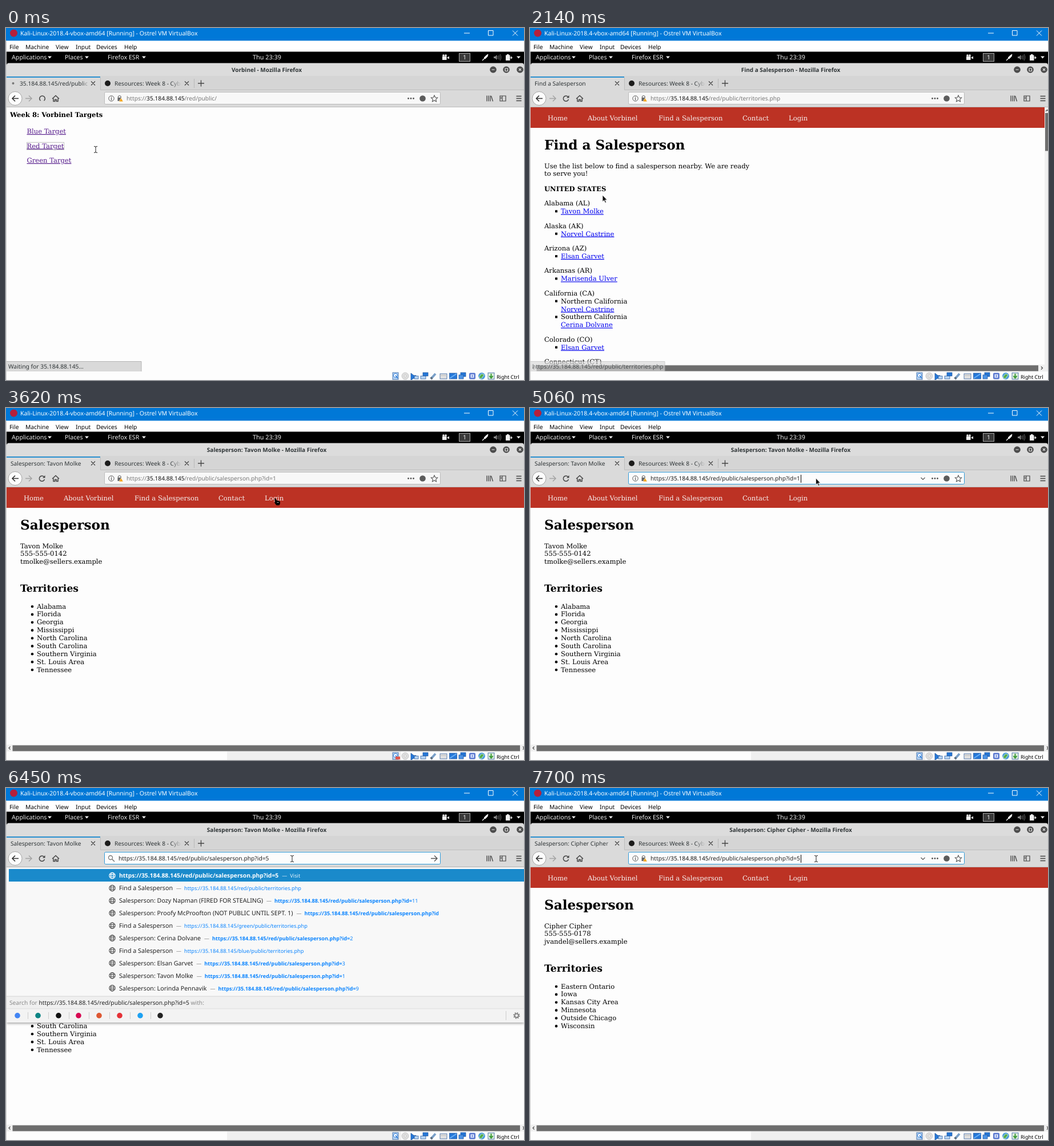
Animation, 907 px wide and 617 px high, one loop 8000 ms. Source, as an HTML page:

```html
<!DOCTYPE html>
<html lang="en">
<head>
<meta charset="utf-8">
<title>Browser session</title>
<style>
  html, body { margin: 0; width: 100%; height: 100%; overflow: hidden; background: #fdfdfd; }
  svg { display: block; }
  text { font-family: "Noto Sans", "Open Sans", sans-serif; white-space: pre; text-rendering: geometricPrecision; }
  .doc { font-family: "DejaVu Serif", serif; }
  .bold { font-weight: bold; }
  .mid { text-anchor: middle; }
  .link { text-decoration: underline; }
</style>
</head>
<body>
<svg id="stage" width="907" height="617" viewBox="0 0 907 617"></svg>
<script>
const LOOP = 8000, INK = '#2e3436', BLUE = '#0a84ff', SCROLL = '#6e6e6e';
const COMPANY = 'Vorbinel', HOST = '35.184.88.145', SITE = `https://${HOST}/red/public/`;
const SELLER = SITE + 'salesperson.php?id=';

const rect = (x, y, w, h, fill, extra = '') =>
  `<rect x="${x}" y="${y}" width="${w}" height="${h}" fill="${fill}" ${extra}/>`;
const dot = (x, y, r, fill, extra = '') => `<circle cx="${x}" cy="${y}" r="${r}" fill="${fill}" ${extra}/>`;
const path = (d, stroke = INK, width = 1.2, fill = 'none') =>
  `<path d="${d}" stroke="${stroke}" stroke-width="${width}" fill="${fill}"/>`;
const text = (x, y, s, size = 10.2, fill = INK, cls = '') =>
  `<text x="${x}" y="${y}" font-size="${size}" fill="${fill}" class="${cls}">${s}</text>`;
const doc = (x, y, s, size = 11.6, fill = '#000', cls = '') => text(x, y, s, size, fill, 'doc ' + cls);
const span = (s, fill, size, dx = 0, weight = 400) =>
  `<tspan dx="${dx}" fill="${fill}" font-size="${size}" font-weight="${weight}">${s}</tspan>`;
const within = (t, ranges) => ranges.some(([a, b]) => t >= a && t < b);
const latest = (list, t) => list.filter(e => e[0] <= t).pop();

// ---- web pages ----
const LINE = 13.88;
const lines = (y, rows, x = 25) => rows.map((s, i) => doc(x, y + i * LINE, s)).join('');
const heading = s => doc(25, 213, s, 23.2, '#000', 'bold');

const navigation = () => rect(1, 139, 906, 36, '#bc3224') +
  [[31, 'Home'], [101, 'About ' + COMPANY], [225, 'Find a Salesperson'], [372, 'Contact'], [453, 'Login']]
    .map(([x, s]) => doc(x, 162, s, 11.6, '#f6f0ef')).join('');

const scrollbar = end => rect(1, 590, 906, 12, '#f0f0f0') + rect(11.5, 591.3, end - 11.5, 10.2, SCROLL) +
  path(`M7.5 593.5l-2.5 2.5 2.5 2.5M${end + 5} 593.5l2.5 2.5-2.5 2.5`, '#444');

function targets() {
  const link = (y, s) => doc(36.5, y, s, 11.6, '#551a8b', 'link');
  return doc(7, 156, `Week 8: ${COMPANY} Targets`, 11.6, '#000', 'bold') +
    link(185, 'Blue Target') + link(210.6, 'Red Target') + link(236, 'Green Target') +
    rect(36.5, 200.5, 65, 13, 'none', 'stroke="#888" stroke-dasharray="1 1"');
}

function home() {
  return navigation() + heading(`Welcome to ${COMPANY}!`) + lines(245.6, [
    COMPANY + ' is a world-wide industry leader with many award-',
    'winning products which have become well-known household',
    'names. Our staff of experts are dedicated to finding synergies',
    'across a wide variety of vertical markets and integrating',
    'technology into everyday life.']) + scrollbar(900);
}

// "*" starts a bullet, "_" marks a link
const STATES = [
  ['Alabama (AL)', '*_Tavon Molke'], ['Alaska (AK)', '*_Norvel Castrine'],
  ['Arizona (AZ)', '*_Elsan Garvet'], ['Arkansas (AR)', '*_Marisenda Ulver'],
  ['California (CA)', '*Northern California', '_Norvel Castrine', '*Southern California', '_Cerina Dolvane'],
  ['Colorado (CO)', '*_Elsan Garvet'], ['Connecticut (CT)']];

function territories() {
  let y = 311.4, out = '';
  for (const rows of STATES) {
    rows.forEach((row, i) => {
      const isLink = row.includes('_');
      if (row[0] === '*') out += rect(44, y - 6, 4, 4, '#000');
      out += doc(i ? 54 : 25, y, row.replace(/[*_]/g, ''), 11.6, isLink ? '#0000ee' : '#000', isLink ? 'link' : '');
      y += LINE;
    });
    y += 11.6;
  }
  return navigation() + heading('Find a Salesperson') +
    lines(245.6, ['Use the list below to find a salesperson nearby. We are ready', 'to serve you!']) +
    doc(25, 285.8, 'UNITED STATES', 11.6, '#000', 'bold') + out + scrollbar(890) +
    rect(901, 139, 6, 463, '#f0f0f0') + rect(902, 149, 5, 66.5, SCROLL) + path('M903 146l2.5-2.5 2.5 2.5', '#444');
}

const seller = (contact, areas) => () => navigation() + heading('Salesperson') + lines(245.6, contact) +
  doc(25, 321.5, 'Territories', 17.2, '#000', 'bold') + lines(351.6, areas, 54) +
  areas.map((_, i) => dot(46, 348 + i * LINE, 2.3, '#000')).join('') + scrollbar(900);

const firstSeller = seller(['Tavon Molke', '555-555-0142', 'tmolke@sellers.example'],
  ['Alabama', 'Florida', 'Georgia', 'Mississippi', 'North Carolina', 'South Carolina',
    'Southern Virginia', 'St. Louis Area', 'Tennessee']);
const secondSeller = seller(['Cipher Cipher', '555-555-0178', 'jvandel@sellers.example'],
  ['Eastern Ontario', 'Iowa', 'Kansas City Area', 'Minnesota', 'Outside Chicago', 'Wisconsin']);

// ---- timeline ----
const PAGES = [
  [0, targets, COMPANY, '', HOST + '/red/public'],
  [150, home, COMPANY, ''],
  [1630, territories, 'Find a Salesperson', 'territories.php'],
  [3080, firstSeller, 'Salesperson: Tavon Molke', 'salesperson.php?id=1'],
  [7000, secondSeller, 'Salesperson: Cipher Cipher', 'salesperson.php?id=5']];
const STATUS = [
  [0, `Waiting for ${HOST}...`, 236], [150, ''], [1360, SITE + 'territories.php', 235],
  [2260, ''], [2680, SELLER + '1', 270], [3080, '']];
const LOADING = [[0, 420], [1630, 1900], [3080, 3350], [7000, 7430]];
const FOCUS = [[4010, 7000], [7580, LOOP]];
const CARET = [[4130, 5210], [7700, LOOP]];
const DISK_BUSY = [[1360, 1480], [3620, 3740], [4940, 5060], [7150, 7300]];
const POINTER = [
  [0, 'beam', 157, 213], [420, 'arrow', 359, 356], [550, 'arrow', 356, 330], [700, 'arrow', 353, 270],
  [820, 'arrow', 348, 205], [940, 'hand', 343, 160], [1090, 'hand', 332, 157], [1210, 'hand', 319, 153],
  [1360, 'hand', 300, 155], [1480, 'hand', 285, 157], [1900, 'arrow', 250, 190], [2020, 'arrow', 180, 250],
  [2140, 'arrow', 127, 293], [2260, 'arrow', 119, 304], [2410, 'hand', 107, 317], [2530, 'hand', 97, 324],
  [2680, 'hand', 98, 318], [3200, 'arrow', 130, 335], [3350, 'arrow', 260, 250], [3470, 'arrow', 388, 190],
  [3620, 'hand', 470, 158], [3740, 'arrow', 488, 138], [3860, 'arrow', 500.5, 123], [5890, 'beam', 501, 124]];

const SHAPES = {
  arrow: path('M0 0v11.5l2.7-2.5 2 4.4 1.8-.8-2-4.2h3.5z', '#fff', .7, '#111'),
  hand: path('M.5 1.5q1-1.5 2 0l1 3 5 1q1.5 1 1 3l-1 3.5h-5l-3-4.5q0-1 1.5-.5z', '#000', 1, '#000') +
    path('M4.5 7.5h3', '#ddd', .8),
  beam: path('M-3-5.5q2.5 0 3 1q.5-1 3-1M0-5v10M-3 5.5q2.5 0 3-1q.5 1 3 1', '#222', 1)
};

// ---- desktop and browser frame ----
const desktop = () =>
  rect(0, 0, 907, 22.5, '#0078d7') + dot(13.5, 9, 6.5, '#b5203c') +
  text(25, 13, 'Kali-Linux-2018.4-vbox-amd64 [Running] - Ostrel VM VirtualBox', 10.5, '#fff') +
  path('M802 9h10M844.5 4.5h8.5v8.5h-8.5zM887 4.5l9 9m0-9l-9 9', '#fff', 1) +
  rect(0, 22.5, 907, 19, '#fff') +
  [[6, 'File'], [34, 'Machine'], [87, 'View'], [122, 'Input'], [158, 'Devices'], [207, 'Help']]
    .map(([x, s]) => text(x, 36.5, s, 10.3, '#000')).join('') +
  rect(1, 41.5, 906, 25, '#000') +
  [[10, 'Applications', 73], [103, 'Places', 138], [178, 'Firefox ESR', 238]].map(([x, s, end]) =>
    text(x, 55.2, s, 10.7, '#eee') + path(`M${end} 49.5h7l-3.5 4z`, 'none', 0, '#eee')).join('') +
  text(457, 55.2, 'Thu 23:39', 10.8, '#eee', 'mid') +
  rect(764, 49.5, 7.5, 6.5, '#eee') + dot(766, 48, 1.8, '#eee') + dot(770, 48, 1.8, '#eee') +
  path('M772 52l4-2.5v5z', 'none', 0, '#eee') +
  rect(793.5, 44.5, 19, 14, '#3a3a3a', 'stroke="#aaa"') + text(803, 55.2, '1', 10.5, '#eee', 'mid') +
  path('M834 57l4-4', '#eee', 1.5) + path('M837 52l4-4 3-2-1 4-4 4z', '#eee', 1, '#eee') +
  path('M854 50h2.5l3-3v9l-3-3h-2.5z', 'none', 0, '#888') +
  path('M861 49q1.5 2.5 0 5M863 47.5q2.5 4 0 8M865 46q3.5 5.5 0 11', '#777', 1) +
  rect(875, 47.5, 7.5, 9.5, '#eee') + rect(877, 46, 3.5, 2, '#eee') + path('M881 52h5m-2-2l2 2-2 2', '#eee', 1.2) +
  path('M894 49.5h7l-3.5 4z', 'none', 0, '#eee');

const URL_ICONS = dot(184.5, 123.5, 4.7, 'none', 'stroke="#555"') + path('M184.5 122.5v4M184.5 120.5v1.2', '#555', 1.2) +
  rect(195.5, 122, 6.5, 6, '#666') + path('M196.5 122v-2q2.3-3 4.6 0v2', '#666') +
  path('M201.5 122.5l3.7 6.5h-7.4z', '#fff', .5, '#f3a51b');
const PAGE_ACTIONS = [704.5, 709, 713.5].map(x => dot(x, 123.5, 1.4, '#555')).join('') +
  dot(729.5, 123.5, 5.3, '#5c5c5c') +
  path('M750 118l1.7 3.7 4 .5-3 2.7 .8 4-3.5-2-3.5 2 .8-4-3-2.7 4-.5z', '#555', 1.1);
const globe = y => `<g transform="translate(186 ${y})" fill="none" stroke="currentColor" stroke-width="1.1">` +
  '<circle r="5.2"/><ellipse rx="2.4" ry="5.2"/><path d="M-5-1.7h10M-5 1.7h10"/></g>';

function tabsAndButtons(page, loading, spinning) {
  const [, , title, , pendingLabel] = page;
  return rect(1, 61.5, 906, 30, '#dcdcdc', 'rx="4"') +
    text(456.5, 76.5, title + ' - Mozilla Firefox', 10, INK, 'mid bold') +
    [853, 876, 900].map(x => dot(x, 73, 5.8, '#4c4c4c')).join('') +
    path('M850.5 73h5M874 71h4.5v4.5h-4.5zM898 71l4 4m0-4l-4 4', '#eee', 1.1) +
    rect(1, 84, 906, 25, '#d5d5d5') + rect(1, 85, 164, 24, '#dadada') + rect(1, 85, 164, 2, '#2a90d0') +
    rect(1, 109, 906, 29, '#dadada') +
    path('M165.5 87v21.5H907', '#bdbdbd', 1) + path('M329.5 89v16', '#b8b8b8', 1) + path('M1 138.5H907', '#bcbcbc', 1) +
    (loading ? dot(12.5, 97, 2, '#777') : '') +
    text(loading ? 24 : 8, 100.7, pendingLabel || title, 10.2, 'url(#fadeA)') +
    dot(178, 97, 5, '#1b1b1b') + text(190, 100.7, 'Resources: Week 8 - Cybersecurity', 10.2, 'url(#fadeB)') +
    path('M149 93.5l7 7m0-7l-7 7M313 93.5l7 7m0-7l-7 7', '#444', 1.2) + path('M336 97h11M341.5 91.5v11', '#444', 1.3) +
    dot(16, 123.5, 12, '#fcfcfc', 'stroke="#a5a5a5"') + path('M22 123.5H11m5-5l-5 5 5 5', '#333', 1.6) +
    path('M34 123.5h11m-5-5l5 5-5 5', '#a4a4a4', 1.5) +
    (spinning ? path('M60.5 127.5a4.8 4.8 0 1 1 6 0', '#444', 1.5)
      : path('M66.5 120.5a4.7 4.7 0 1 0 1 4.5', '#444', 1.5) + path('M68.5 118v4.5h-4.5z', 'none', 0, '#444')) +
    path('M81 124l6-5.5 6 5.5M83 123.5v5h2.7v-3h2.6v3h2.7v-5', '#444', 1.5) +
    path('M842 118.5v10M845 118.5v10M848 118.5v10M849.5 119l3 9.5', '#444', 1.3) +
    path('M865 119h10v9h-10zM869 119v9M866 121.5h2M866 123.5h2', '#444', 1.2) +
    path('M893.5 119.5h9M893.5 123.5h9M893.5 127.5h9', '#444', 1.4);
}

function addressBar(t, page, typed) {
  const focused = within(t, FOCUS), searching = t >= 5890 && t < 7000;
  let out = rect(172.5, 112.5, 588, 21, focused ? '#fcfcfc' : '#f8f8f8',
    `rx="2" stroke="${focused ? '#2f9ad8' : '#bababa'}"`);
  if (searching) {
    return out + dot(183, 122, 3.5, 'none', 'stroke="#777" stroke-width="1.3"') + path('M185.5 124.5l4.5 4.5', '#777', 1.5) +
      text(197, 127.4, typed, 10.25, '#222') + path('M744 123.5h11m-5-5l5 5-5 5', '#555', 1.4);
  }
  const faint = focused ? '#222' : '#777';
  out += URL_ICONS + PAGE_ACTIONS +
    text(211, 127.4, span('https://', faint, 10.2) + span(HOST, '#111', 10.2) + span('/red/public/' + page[3], faint, 10.2));
  if (focused) out += path('M684.5 122l3.5 3.5 3.5-3.5', '#555');
  if (within(t, CARET)) out += rect(474, 117, 1, 14, '#000');
  return out;
}

const SUGGESTIONS = [
  ['Find a Salesperson', 'red'], ['Salesperson: Dozy Napman (FIRED FOR STEALING)', 11],
  ['Salesperson: Proofy McProofton (NOT PUBLIC UNTIL SEPT. 1)', 10], ['Find a Salesperson', 'green'],
  ['Salesperson: Cerina Dolvane', 2], ['Find a Salesperson', 'blue'], ['Salesperson: Elsan Garvet', 3],
  ['Salesperson: Tavon Molke', 1], ['Salesperson: Lorinda Pennavik', 9]];
const ENGINES = ['#4285f4', '#0c8484', '#111', '#d70a53', '#de5833', '#e53238', '#1da1f2', '#222'];

function suggestions(count, typed) {
  const row = i => 153.6 + i * 21.9, search = row(count) + 3.5, engines = search + 22.8;
  const list = SUGGESTIONS.slice(0, count - 1).map(([title, key], i) => {
    const y = row(i + 1);
    const link = typeof key === 'string'
      ? span(`https://${HOST}/${key}/public/territories.php`, BLUE, 9.2, 5)
      : span(SELLER, BLUE, 9.15, 5, 700) + span(key, BLUE, 9.2);
    return globe(y) + text(198, y + 3.8, span(title, '#222', 10.7) + span('—', '#888', 9, 6) + link);
  }).join('');
  const marks = ENGINES.map((color, i) => {
    const x = Math.round(20 + i * 35.75);
    return dot(x, engines, 4.8, color) + (i < 7 ? rect(x + 18, engines - 6, 1, 12, '#ccc') : '');
  }).join('');
  return rect(1, 139, 906, engines + 12 - 139, '#f8f8f8', 'filter="url(#shadow)"') +
    rect(5, 142, 902, 22, '#1a8acb') + `<g color="#fff">${globe(row(0))}</g>` +
    text(198, row(0) + 3.8, span(typed, '#fff', 10.35, 0, 700) + span('—', '#cfe6f5', 9, 6) + span('Visit', '#e6f3fb', 9.2, 5)) +
    `<svg width="757.5" height="617" color="#555">${list}</svg>` +
    rect(1, search - 11, 906, 22, '#f0f0f0') + path(`M1 ${search - 11}H907M1 ${search + 11}H907`, '#d4d4d4', 1) +
    text(6, search + 3.8, span('Search for ', '#888', 10.2) + span(typed, '#222', 10.25) + span(' with:', '#888', 10.2)) +
    rect(1, engines - 11.5, 906, 23.5, '#f3f3f3') + marks + rect(875, engines - 8, 1, 16, '#ccc') +
    dot(894, engines, 3.2, 'none', 'stroke="#777" stroke-width="1.5"') +
    dot(894, engines, 4.9, 'none', 'stroke="#777" stroke-width="1.8" stroke-dasharray="1.9 1.95"');
}

function machineStatus(t) {
  const blue = '#2678d8', pale = '#b9d6f4';
  const screen = (x, y, w, h, fill = blue) => rect(x, y, w, h, fill, 'stroke="#1c4f96" stroke-width=".7"');
  return rect(1, 602, 906, 15, '#fdfdfd') + (t >= 3620 ? rect(387, 602, 305, 15, '#f0f0f0') : '') +
    screen(677, 604, 10, 12, pale) + dot(682, 609, 3.5, '#fff', `stroke="${blue}"`) + path('M682 609l4 5', blue, 1.5) +
    (within(t, DISK_BUSY) ? rect(682, 611, 8, 5, '#e2574c') : '') +
    dot(699, 610, 6, '#dedede', 'stroke="#bbb" stroke-width=".7"') + dot(699, 610, 1.8, '#fff', 'stroke="#aaa" stroke-width=".6"') +
    path('M709 605l5 4h4v5h-4l-5 3z', '#1c4f96', .7, blue) + screen(715, 610, 7, 5, pale) +
    screen(730, 604, 9, 6) + screen(726, 610, 9, 5, pale) +
    path('M744 615l8-9', '#7aa0c9', 4) + path('M744 615l2-2.5', '#5d6d7d', 4) +
    screen(760, 606, 12, 9, '#e0e0e0') + path('M760 609h12', '#bbb', 1) +
    screen(776.5, 605, 13, 10) + path('M777 614l12-8', '#69aef5', 2) +
    screen(796, 604, 9, 7) + screen(793, 608, 8, 7, '#4b93e6') +
    rect(811, 604.5, 11, 11, '#5a78d0', 'rx="2"') + rect(813.5, 607, 6, 6, '#dfe7fb') + path('M816.5 608v4', '#5a78d0', 1.5) +
    dot(833, 610, 6, '#4f9fd8') + path('M828 612l5-6 4 2-5 7z', '#fff', .6, '#52ad45') +
    screen(844, 604.5, 11, 11, '#dfeedd') + path('M849.5 606v7m-3-3l3 3.5 3-3.5', '#3b9a36', 2) +
    text(859, 614.5, 'Right Ctrl', 9, '#000');
}

const DEFS = `<defs>${[['fadeA', 132, 146], ['fadeB', 288, 307]].map(([id, a, b]) =>
  `<linearGradient id="${id}" gradientUnits="userSpaceOnUse" x1="${a}" x2="${b}" y1="0" y2="0">` +
  `<stop stop-color="${INK}"/><stop offset="1" stop-color="${INK}" stop-opacity="0"/></linearGradient>`).join('')}
  <filter id="shadow" x="-5%" width="110%" y="-5%" height="115%"><feDropShadow dx="0" dy="2" stdDeviation="2" flood-opacity=".35"/></filter></defs>`;

function scene(t) {
  const page = latest(PAGES, t), [, message, width] = latest(STATUS, t), [, shape, x, y] = latest(POINTER, t);
  const loading = within(t, LOADING), typed = SELLER + (t >= 6450 ? '5' : '');
  let out = DEFS + rect(0, 0, 907, 617, '#fdfdfd') + page[1]();
  if (message) {
    const opacity = t >= 2140 && t < 2260 ? .65 : 1;
    out += `<g opacity="${opacity}">` + rect(1, 584.5, width, 17.5, '#d9d9d9') +
      path(`M1 584.5h${width}v17.5`, '#b5b5b5', 1) + text(4, 597.2, message, 10.3) + '</g>';
  }
  out += machineStatus(t) + desktop() + tabsAndButtons(page, loading, loading || t < 700) + addressBar(t, page, typed);
  if (t >= 5770 && t < 7000) out += suggestions(t < 6730 ? 10 : 1, typed);
  return out + rect(0, 22.5, 1, 595, '#cfcfcf') + `<g transform="translate(${x} ${y})">${SHAPES[shape]}</g>`;
}

const stage = document.getElementById('stage');
let shown = '';
function tick(now) {
  const markup = scene(now % LOOP);
  if (markup !== shown) stage.innerHTML = shown = markup;
  requestAnimationFrame(tick);
}
tick(performance.now());
</script>
</body>
</html>
```
